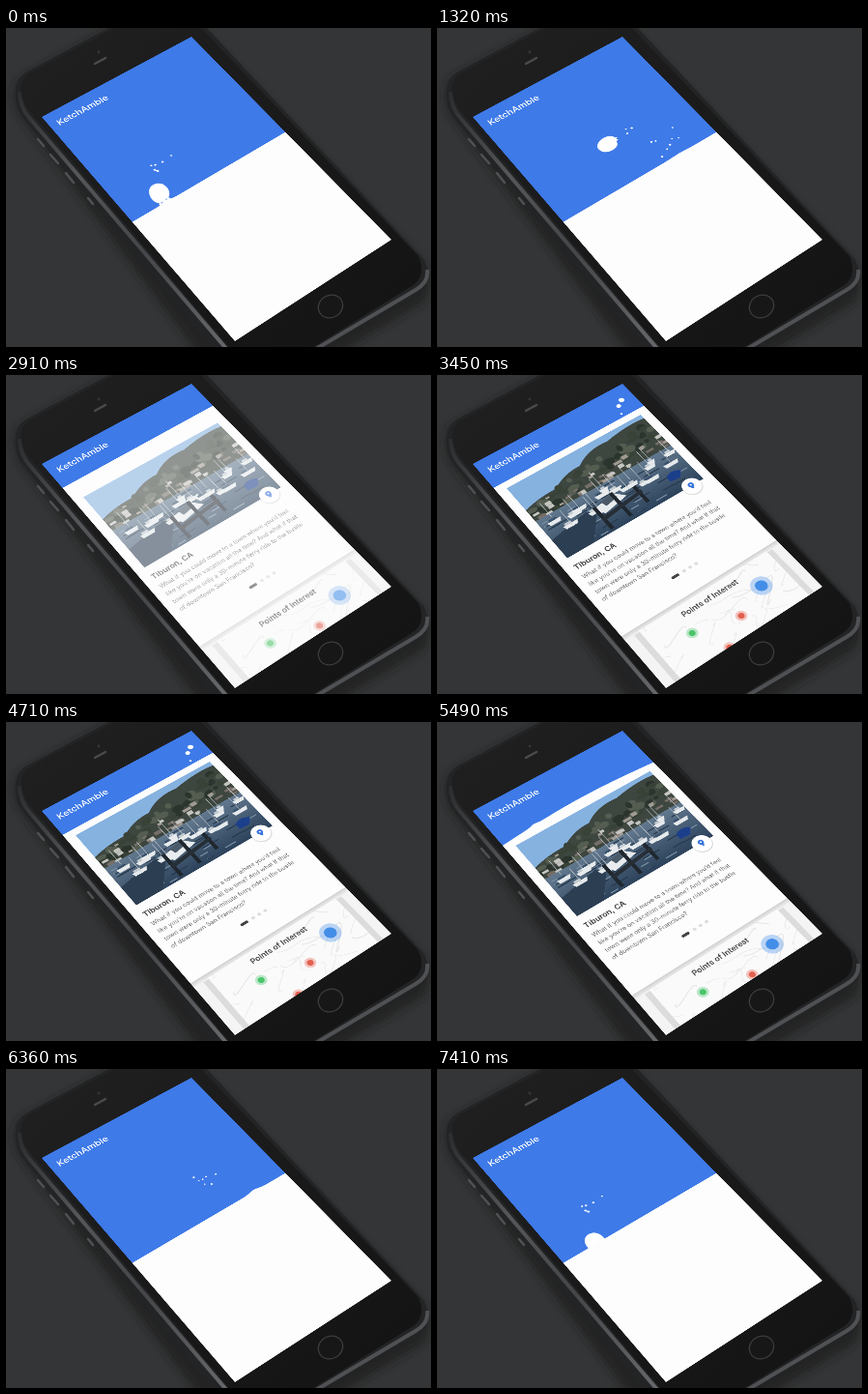
An HTML page that plays this animation: 440 px wide and 330 px high, repeating every 7440 ms.

```html
<!DOCTYPE html>
<html lang="en">
<head>
<meta charset="utf-8">
<style>
  html, body { margin: 0; width: 100%; height: 100%; overflow: hidden; background: #343536; }
  #stage { position: relative; width: 440px; height: 330px; overflow: hidden; }
  svg { position: absolute; left: 0; top: 0; display: block; }
  #screen { transform-origin: 0 0; }
  text { font-family: Inter, "Open Sans", sans-serif; }
</style>
</head>
<body>
<div id="stage">
  <svg width="440" height="330" viewBox="0 0 440 330">
    <defs>
      <linearGradient id="rim" x1="0" y1="0" x2="1" y2="1">
        <stop offset="0" stop-color="#2c2d2f"/><stop offset=".3" stop-color="#55575a"/>
        <stop offset=".6" stop-color="#454649"/><stop offset="1" stop-color="#67696c"/>
      </linearGradient>
      <linearGradient id="face" x1="0" y1="0" x2="1" y2="1">
        <stop offset="0" stop-color="#202021"/><stop offset="1" stop-color="#131313"/>
      </linearGradient>
      <filter id="soft" x="-20%" y="-20%" width="140%" height="140%"><feGaussianBlur stdDeviation="4"/></filter>
    </defs>
    <rect width="440" height="330" fill="#343536"/>
    <path d="M110 0L14 52Q4 64 12 88L205 345H330L432 284Q444 266 434 246L205 5Z" fill="#1d1d1e" opacity=".7" filter="url(#soft)"/>
    <path d="M110 -2L20 46Q6 56 11 80Q13 88 20 96L216 334H325L428 275Q442 262 433 240L206 -2Z" fill="#232425"/>
    <path d="M14 66Q14 82 25 94L230 334" fill="none" stroke="url(#rim)" stroke-width="4"/>
    <path d="M436 250Q438 263 424 271L316 335" fill="none" stroke="#505154" stroke-width="4"/>
    <path d="M116 -2L24 47Q12 55 17 72Q19 80 26 88L234 334H312L420 267Q436 257 427 236L200 -2Z" fill="url(#face)"/>
    <path d="M33 115L39 122M46 131L54 140M62 150L70 160M85 176L90 182" stroke="#505154" stroke-width="2.5" stroke-linecap="round"/>
    <path d="M92 37L103 31" stroke="#4b4b4d" stroke-width="2.5" stroke-linecap="round"/>
    <circle cx="96" cy="25" r="1.4" fill="#35363a"/>
    <ellipse cx="336" cy="288" rx="13" ry="11.5" transform="rotate(-30 336 288)" fill="#171717" stroke="#3d3d3e" stroke-width="1.3"/>
  </svg>

  <svg id="screen" width="380" height="660" viewBox="-10 -10 380 660">
    <defs>
      <clipPath id="glass"><rect width="360" height="640"/></clipPath>
      <clipPath id="photoClip"><rect x="20" y="92" width="320" height="210"/></clipPath>
      <clipPath id="mapClip"><rect x="32" y="514" width="296" height="360"/></clipPath>
      <linearGradient id="water" x1="0" y1="0" x2="0" y2="1">
        <stop offset="0" stop-color="#61788e"/><stop offset="1" stop-color="#2d435c"/>
      </linearGradient>
      <linearGradient id="edge" x1="0" y1="0" x2="0" y2="1">
        <stop offset="0" stop-color="#cfcfcf"/><stop offset="1" stop-color="#f4f4f4"/>
      </linearGradient>
    </defs>
    <g clip-path="url(#glass)">
      <rect width="360" height="640" fill="#3e7ae8"/>
      <g id="leaps" fill="#fff"></g>
      <path id="surface" fill="#fdfdfd"/>
      <g id="content">
        <g id="photo" clip-path="url(#photoClip)"></g>
        <circle cx="311" cy="305" r="21" fill="#000" opacity=".13"/>
        <circle cx="311" cy="303" r="20" fill="#fff"/>
        <path d="M311 311C307 305 305 302 305 299.500A6 6 0 0 1 317 299.500C317 302 315 305 311 311Z" fill="#3875dc"/>
        <circle cx="311" cy="299.500" r="2" fill="#fff"/>
        <text x="18" y="335" font-size="16" font-weight="600" fill="#3b3b3b">Tiburon, CA</text>
        <g id="copy" font-size="12.5" fill="#6c6c6c"></g>
        <rect x="148" y="454" width="17" height="6" rx="3" fill="#444"/>
        <g id="pages" fill="#ddd"></g>
        <rect y="505" width="360" height="400" fill="#f4f4f4"/>
        <rect x="20" y="512" width="320" height="400" fill="#dcdcdc"/>
        <rect y="505" width="360" height="12" fill="url(#edge)"/>
        <g id="map" clip-path="url(#mapClip)"></g>
        <text x="178" y="540" font-size="15.5" font-weight="600" fill="#444" text-anchor="middle">Points of Interest</text>
        <g id="markers"></g>
      </g>
      <text x="16" y="40" font-size="20" font-weight="500" fill="#fff">KetchAmble</text>
      <g id="icon" fill="#fff">
        <circle cx="332" cy="36" r="6"/><circle cx="318" cy="46" r="5"/><circle cx="310" cy="67" r="2.5"/>
      </g>
    </g>
  </svg>
</div>
<script>
const LOOP = 7440, REST = 318, HEADER = 76, SLIDE = 236;
const byId = id => document.getElementById(id);
const clamp = v => Math.min(1, Math.max(0, v));
const span = (t, a, b) => clamp((t - a) / (b - a));
const inOut = p => p < .5 ? 4 * p ** 3 : 1 - 4 * (1 - p) ** 3;
const outCubic = p => 1 - (1 - p) ** 3;

function make(tag, attrs, parent) {
  const node = document.createElementNS('http://www.w3.org/2000/svg', tag);
  for (const k in attrs) node.setAttribute(k, attrs[k]);
  parent.appendChild(node);
  return node;
}
function randomizer(seed) {
  return () => (seed = (seed * 16807) % 2147483647) / 2147483647;
}
function track(keys, t) {
  let i = 1;
  while (i < keys.length - 1 && t > keys[i][0]) i++;
  const [a, x] = keys[i - 1], [b, y] = keys[i];
  return x + (y - x) * (t - a) / (b - a);
}

// Projects a w × h plane, surrounded by a margin, onto four corners, clockwise from top left.
function project(node, w, h, margin, [[x0, y0], [x1, y1], [x2, y2], [x3, y3]]) {
  const sx = x0 - x1 + x2 - x3, sy = y0 - y1 + y2 - y3;
  const ax = x1 - x2, ay = y1 - y2, bx = x3 - x2, by = y3 - y2;
  const den = ax * by - bx * ay;
  const g = (sx * by - bx * sy) / den, k = (ax * sy - sx * ay) / den;
  const matrix = [
    (x1 - x0 + g * x1) / w, (y1 - y0 + g * y1) / w, 0, g / w,
    (x3 - x0 + k * x3) / h, (y3 - y0 + k * y3) / h, 0, k / h,
    0, 0, 1, 0, x0, y0, 0, 1].map(v => v.toFixed(9)).join();
  node.style.transform = `matrix3d(${matrix}) translate(${-margin}px, ${-margin}px)`;
}

function buildPhoto() {
  const photo = byId('photo'), rnd = randomizer(41);
  const box = (x, y, width, height, fill) => make('rect', { x, y, width, height, fill }, photo);
  const shape = (d, fill) => make('path', { d, fill }, photo);
  box(20, 92, 320, 210, '#86b2e0');
  shape('M20 160Q60 148 95 150Q130 128 165 130Q200 104 245 110Q300 98 340 104V210H20Z', '#3d463f');
  for (let i = 0; i < 60; i++) {
    const x = 20 + rnd() * 320, y = 162 - (x - 20) * .14 + rnd() * 40;
    make('ellipse', { cx: x, cy: y, rx: 5 + rnd() * 8, ry: 4 + rnd() * 5, fill: ['#2b342d', '#545d50', '#384236'][i % 3] }, photo);
  }
  for (let i = 0; i < 36; i++)
    box(22 + rnd() * 310, 156 + rnd() * 34, 6 + rnd() * 13, 4 + rnd() * 6, ['#a09a92', '#766e68', '#c4c4c0'][i % 3]);
  box(20, 194, 320, 108, 'url(#water)');
  for (let i = 0; i < 55; i++)
    box(20 + rnd() * 310, 197 + rnd() * 100, 10 + rnd() * 28, 2.5, i % 3 ? '#26384b' : '#7990a4');
  shape('M20 250L110 232L126 246L80 302H20Z', '#2c3e52');
  for (let i = 0; i < 17; i++) {
    const x = 34 + i * 17 + rnd() * 10, y = 198 + rnd() * 46, w = 18 + rnd() * 18;
    shape(`M${x} ${y}h${w}l-5 9h${8 - w}Z`, '#e6eaec');
    box(x + 5, y - 5, w * .45, 5, i % 3 ? '#c4ccd2' : '#39516c');
    box(x + w / 2, y - 34 - rnd() * 18, 1.2, 42, '#c5cbcd');
  }
  shape('M128 236L178 226L196 246L138 258Z', '#e8ecee');
  shape('M146 230L172 225L180 238L150 244Z', '#4b5a68');
  for (const [x, y, h] of [[124, 232, 64], [170, 222, 70], [216, 236, 48]]) box(x, y, 8, h, '#20272f');
  shape('M126 262L226 250V258L126 272Z', '#262e36');
  shape('M284 256Q302 244 318 258L306 272L284 270Z', '#1c3f8c');
}

function buildText() {
  ['What if you could move to a town where you’d feel', 'like you’re on vacation all the time? And what if that',
    'town were only a 30-minute ferry ride to the bustle', 'of downtown San Francisco?'].forEach((line, i) => {
    make('text', { x: 18, y: 360 + i * 21 }, byId('copy')).textContent = line;
  });
  for (let i = 0; i < 3; i++) make('circle', { cx: 177 + i * 14, cy: 457, r: 3.5 }, byId('pages'));
}

function buildMap() {
  const map = byId('map'), rnd = randomizer(7);
  make('rect', { x: 24, y: 514, width: 312, height: 360, fill: '#fafafa' }, map);
  for (let i = 0; i < 34; i++) {
    const x = 24 + rnd() * 300, y = 520 + rnd() * 180, dx = rnd() * 100 - 50, dy = rnd() * 70 - 35;
    make('path', {
      d: `M${x} ${y}q${dy} ${dx * .4} ${dx} ${dy}t${dx * .8} ${dy * .5}`,
      fill: 'none', stroke: '#e6e6e6', 'stroke-width': i % 4 ? 1.2 : 2
    }, map);
  }
  for (const [cx, cy, r, color] of [[271, 570, 21, '#438ee8'], [200, 600, 11, '#e2604f'], [106, 576, 11, '#4bc46c'], [141, 641, 11, '#e2604f']]) {
    make('circle', { cx, cy, r, fill: color, opacity: .35 }, byId('markers'));
    make('circle', { cx, cy, r: r * .57, fill: color }, byId('markers'));
  }
}

// Each leap: a blob on a half circle, leaving droplets behind.
const swing = [[-60, -.2], [-30, .03], [0, .25], [180, .82], [360, 1.64], [540, 2.4], [700, 2.95], [800, 3.45]];
const sprays = [
  { count: 8, at: 360, x: 92, y: 278, dx: 30, dy: 30, born: 190, dies: 720, fall: .07 },
  { count: 3, at: 360, x: 134, y: 212, dx: 14, dy: 10, born: 270, dies: 660, fall: .05 },
  { count: 7, at: 960, x: 233, y: 241, dx: 26, dy: 20, born: 560, dies: 1150, fall: .03 }
];
const leaps = [[0, 1], [960, -1], [1920, 1], [5520, 1], [6480, -1]].map(([start, dir], n) => {
  const group = make('g', dir < 0 ? { transform: 'translate(360) scale(-1 1)' } : {}, byId('leaps'));
  const rnd = randomizer(101 + n * 37), drops = [];
  for (const s of sprays)
    for (let i = 0; i < s.count; i++)
      drops.push({
        ...s, x: s.x + (rnd() * 2 - 1) * s.dx, y: s.y + (rnd() * 2 - 1) * s.dy,
        node: make('circle', { r: 1.4 + rnd() * 1.2 }, group)
      });
  return { start, dir, drops, blob: make('path', {}, group) };
});

function blobPath(q, age) {
  const rx = 23 - 2 * q, ry = 18 - q, c = ry * 1.33, wag = 2 * Math.sin(age / 45);
  const drip = (x, y, r) => `M${x - r} ${y}a${r} ${r} 0 1 0 ${2 * r} 0a${r} ${r} 0 1 0 ${-2 * r} 0Z`;
  return `M${rx} 0C${rx} ${-c} ${-rx} ${-c} ${-rx} -4L${-rx - 5 * q} ${-3 + wag}L${-rx + 1} 1` +
    `L${-rx - 3} ${6 - wag}L${-rx + 4} 6C${-rx + 4} ${c} ${rx} ${c} ${rx} 0Z` +
    (q < .8 ? drip(-rx - 2, -7, 2.4) + drip(-rx - 4, 4, 1.8) + drip(-rx + 3, 12, 2.6) : '');
}

function drawLeap(leap, t) {
  const age = (t - leap.start + 60 + LOOP) % LOOP - 60;
  const flying = age < 800;
  leap.age = age;
  leap.blob.style.display = flying ? '' : 'none';
  if (flying) {
    const a = track(swing, age);
    const x = 180 - 105 * Math.cos(a), y = REST - 103 * Math.sin(a);
    leap.blob.setAttribute('d', blobPath(span(age, 130, 320), age));
    leap.blob.setAttribute('transform', `translate(${x} ${y}) rotate(${a * 180 / Math.PI - 90})`);
  }
  for (const d of leap.drops) {
    const on = age > d.born && age < d.dies;
    d.node.style.display = on ? '' : 'none';
    if (!on) continue;
    d.node.setAttribute('cx', d.x);
    d.node.setAttribute('cy', d.y + (age - d.at) * d.fall);
  }
}

function surfacePath(base, bulge) {
  const bell = (x, at, width) => Math.exp(-(((x - at) / width) ** 2));
  const pulse = (age, from, to) => Math.sin(Math.PI * span(age, from, to));
  let d = 'M0 640';
  for (let x = 0; x <= 360; x += 6) {
    let y = base - bulge * Math.sin(Math.PI * x / 360);
    for (const { age, dir } of leaps) {
      const along = dir > 0 ? x : 360 - x;
      y -= 6 * pulse(age, -60, 120) * bell(along, 77, 10) + 1.5 * pulse(age, 120, 600) * bell(along, 90, 20) +
        4 * pulse(age, 700, 950) * bell(along, 285, 14);
    }
    d += `L${x} ${y.toFixed(2)}`;
  }
  return d + 'L360 640Z';
}

function draw(t) {
  for (const leap of leaps) drawLeap(leap, t);
  const travel = REST - HEADER;
  const back = span(t, 5300, 5890), up = span(t, 2450, 2900);
  const returning = t > 5000;
  const level = returning ? HEADER + travel * inOut(back) : REST - travel * inOut(up);
  const bulge = returning ? 22 * Math.sin(Math.PI * span(t, 5400, 6000)) : -16 * Math.sin(Math.PI * up);
  byId('surface').setAttribute('d', surfacePath(level, bulge));

  const shift = SLIDE * (returning ? inOut(back) : 1 - outCubic(span(t, 2500, 3300)));
  const shown = returning ? 1 - span(t, 5550, 6000) : span(t, 2600, 3150);
  const content = byId('content');
  content.setAttribute('transform', `translate(0 ${shift.toFixed(2)})`);
  content.setAttribute('opacity', shown);
  byId('icon').setAttribute('opacity', span(t, 3100, 3400) * (1 - span(t, 5300, 5450)));
}

project(byId('screen'), 360, 640, 10, [[37, 92], [192, 9], [399, 219], [237, 324]]);
buildPhoto();
buildText();
buildMap();
const began = performance.now();
function tick() {
  draw((performance.now() - began) % LOOP);
  requestAnimationFrame(tick);
}
draw(0);
requestAnimationFrame(tick);
</script>
</body>
</html>
```
